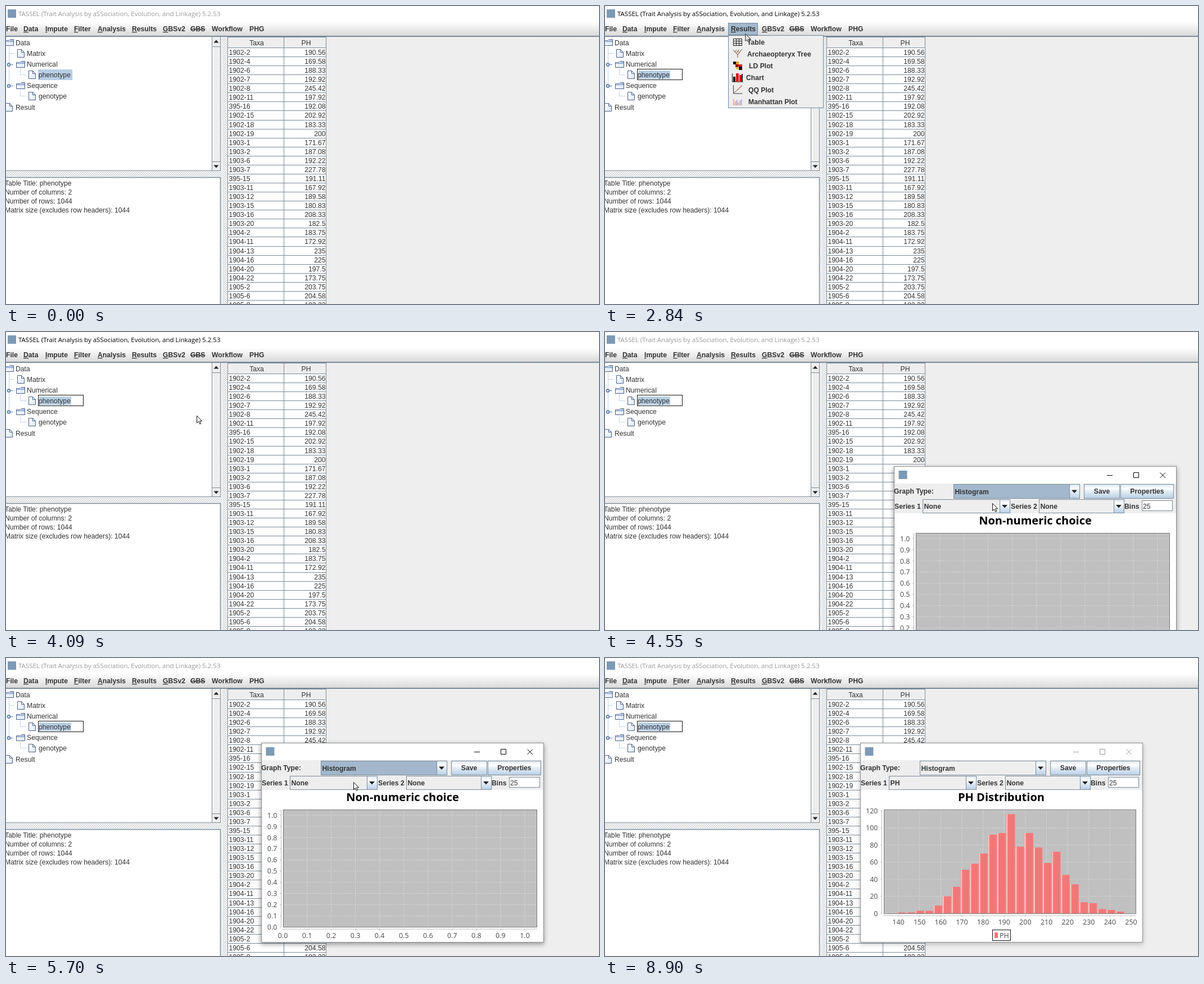
Animation, 1055 px wide and 531 px high, one loop 9750 ms. Source, as an HTML page:

```html
<!DOCTYPE html>
<html lang="en">
<head>
<meta charset="utf-8">
<title>Histogram walkthrough</title>
<style>
html, body { margin: 0; width: 100%; height: 100%; overflow: hidden; background: #eee; }
svg { display: block; width: 100%; height: 100%; }
text { font: 12.2px "Liberation Sans", Arial, sans-serif; fill: #333; white-space: pre; }
.b { font-weight: bold; }
.caption { font: 11.5px "Open Sans", "Noto Sans", sans-serif; }
.tick { font: 12.5px "Noto Sans", sans-serif; fill: #555; }
.heading { font: bold 20px "Noto Sans", sans-serif; fill: #000; }
</style>
</head>
<body>
<svg id="stage" viewBox="0 0 1055 531" xmlns="http://www.w3.org/2000/svg"></svg>
<script>
const LOOP = 9750;
const EDGE = '#7a8a99', SELECT = '#b8cfe5', HOVER = '#a3b8cc', PANEL = '#eeeeee';

const range = (n, fn) => Array.from({ length: n }, (_, i) => fn(i)).join('');
const rect = (x, y, w, h, fill, stroke = 'none', more = '') =>
  `<rect x="${x}" y="${y}" width="${w}" height="${h}" fill="${fill}" stroke="${stroke}" ${more}/>`;
const box = (x, y, w, h, fill, stroke = EDGE, more = '') =>
  rect(x + .5, y + .5, w - 1, h - 1, fill, stroke, more);
const path = (d, stroke = EDGE, fill = 'none', more = '') =>
  `<path d="${d}" stroke="${stroke}" fill="${fill}" ${more}/>`;
const text = (x, y, s, cls = '', anchor = 'start', more = '') =>
  `<text x="${x}" y="${y}" class="${cls}" text-anchor="${anchor}" ${more}>${s}</text>`;
const group = (id, body, more = '') => `<g id="${id}" ${more}>${body}</g>`;

const defs = `<defs>
  <linearGradient id="bar" x2="0" y2="1"><stop stop-color="#fff"/><stop offset="1" stop-color="#dadada"/></linearGradient>
  <linearGradient id="button" x2="0" y2="1"><stop stop-color="#dde8f3"/><stop offset=".3" stop-color="#fff"/>
    <stop offset=".5" stop-color="#e4edf6"/><stop offset="1" stop-color="#b8cfe5"/></linearGradient>
  <linearGradient id="column"><stop stop-color="#f57a7a"/><stop offset=".1" stop-color="#ffe0e0"/>
    <stop offset=".2" stop-color="#f57878"/><stop offset=".8" stop-color="#ee7777"/><stop offset="1" stop-color="#f28484"/></linearGradient>
  <linearGradient id="sheet" x2="1" y2="1"><stop stop-color="#fff"/><stop offset="1" stop-color="#dce8f5"/></linearGradient>
  <pattern id="bumps" width="4" height="4" patternUnits="userSpaceOnUse">
    <path d="M0 0h1v1h-1zM2 2h1v1h-1z" fill="#a9b3bd"/><path d="M1 1h1v1h-1zM3 3h1v1h-1z" fill="#fff"/></pattern>
  <filter id="blur" x="-10%" y="-10%" width="120%" height="120%"><feGaussianBlur stdDeviation="4"/></filter>
</defs>`;

// Main window

const menuNames = [[0, 'File'], [31, '_Data'], [70, '_Impute'], [121, '_Filter'], [163, '_Analysis'],
  [224, '_Results'], [279, '_GBSv2'], [328, '-GBS'], [366, 'Workflow'], [433, 'PHG']];
const decorate = s =>
  s[0] === '_' ? `<tspan text-decoration="underline">${s[1]}</tspan>${s.slice(2)}` :
  s[0] === '-' ? `<tspan text-decoration="line-through">${s.slice(1)}</tspan>` : s;
const menuBar = () =>
  rect(0, 0, 1055, 28, '#fff') + rect(0, 28, 1055, 25, 'url(#bar)') + rect(0, 53, 1055, 2, EDGE) +
  rect(3, 6, 15, 15, '#7d9ab5') +
  text(22, 18, 'TASSEL (Trait Analysis by aSSociation, Evolution, and Linkage) 5.2.53', 'caption', 'start', 'id="title"') +
  group('menuButton', box(219, 30, 53, 22, HOVER)) +
  menuNames.map(([x, s]) => text(x, 45, decorate(s), 'b')).join('');

const folder = (x, y) =>
  path(`M${x + .5} ${y + 11.5}V${y + 2.5}H${x + 7.5}L${x + 9.5} ${y + .5}H${x + 15.5}V${y + 11.5}Z`, '#4a5f85', 'url(#sheet)') +
  path(`M${x + 1} ${y + 4.5}H${x + 15}M${x + 9} ${y + 2.5}H${x + 15}`, '#6382bf');
const sheet = (x, y) =>
  path(`M${x + .5} ${y + .5}H${x + 7.5}L${x + 12.5} ${y + 5.5}V${y + 14.5}H${x + .5}Z`, '#4a5f85', 'url(#sheet)') +
  path(`M${x + 7.5} ${y + .5}V${y + 5.5}H${x + 12.5}`, '#4a5f85');
const handle = y => path(`M7 ${y}H13`, '#6382bf') +
  `<circle cx="5" cy="${y}" r="2.5" fill="#dce8f5" stroke="#4a6fa5" stroke-width="1.4"/>`;
const arrow = (x, y, dir) => path(`M${x - 4.5} ${y - 2.5 * dir}h9l-4.5 ${5 * dir}z`, 'none', '#222');

const tree = () =>
  rect(0, 55, 382, 239, '#fff') + rect(366, 55, 16, 239, PANEL) +
  path('M366.5 55V293M381.5 55V293M0 293.5H382M366 72.5H382M366 277.5H382') +
  path('M368.5 73V277', '#fff') + arrow(374, 63, -1) + arrow(374, 286, 1) +
  path('M5.5 72V142M5 84.5H15M25.5 111V122.5H36M25.5 150V160.5H36', '#c3d4e6') +
  folder(-2, 59) + sheet(20, 77) + folder(18, 98) + sheet(40, 115) + folder(18, 136) + sheet(40, 153) + sheet(-1, 173) +
  handle(104.5) + handle(142.5) +
  group('picked', box(57, 113, 61, 19, SELECT, SELECT, 'id="pickedBox"')) +
  group('editor', box(57, 112, 81, 20, '#fff', '#111') + rect(59, 115, 57, 15, SELECT)) +
  [[17, 70, 'Data'], [37, 89, 'Matrix'], [37, 108, 'Numerical'], [58, 127, 'phenotype'],
   [37, 146, 'Sequence'], [58, 165, 'genotype'], [17, 185, 'Result']].map(a => text(...a)).join('');

const info = () =>
  rect(0, 305, 382, 226, '#fff') + path('M0 305.5H381.5V531', EDGE, 'none', 'stroke-width="1.5"') +
  rect(0, 295, 383, 9, 'url(#bumps)') + rect(385, 55, 8, 476, 'url(#bumps)') +
  ['Table Title: phenotype', 'Number of columns: 2', 'Number of rows: 1044', 'Matrix size (excludes row headers): 1044']
    .map((s, i) => text(-2, 320 + 16.1 * i, s)).join('');

const records = `1902-2 190.56,1902-4 169.58,1902-6 188.33,1902-7 192.92,1902-8 245.42,1902-11 197.92,395-16 192.08,
1902-15 202.92,1902-18 183.33,1902-19 200,1903-1 171.67,1903-2 187.08,1903-6 192.22,1903-7 227.78,395-15 191.11,
1903-11 167.92,1903-12 189.58,1903-15 180.83,1903-16 208.33,1903-20 182.5,1904-2 183.75,1904-11 172.92,1904-13 235,
1904-16 225,1904-20 197.5,1904-22 173.75,1905-2 203.75,1905-6 204.58,1905-8 183.33`
  .split(',').map(s => s.trim().split(' '));
const rowY = i => Math.round(74 + 16.07 * i);
const table = () =>
  rect(394, 75, 176, 456, '#fff') + rect(394, 55, 176, 19, PANEL) +
  text(446, 70, 'Taxa', '', 'middle') + text(534, 70, 'PH', '', 'middle') +
  path('M394.5 55V531M494.5 55V531M569.5 55V531M394 55.5H570') +
  records.map(([name, value], i) =>
    path(`M394 ${rowY(i) + .5}H570`) + text(396.5, rowY(i) + 13, name) + text(568.5, rowY(i) + 13, value, '', 'end')).join('');

// Results menu

const itemTop = i => 53 + 21.15 * i;
const menuIcons = () =>
  path('M228 58.5h16M228 62.5h16M228 66.5h16M228 70.5h16M228.5 58v13M233.5 58v13M238.5 58v13M243.5 58v13', '#222') +
  path('M228 78l8 9v5M244 77l-8 10M231 82l3-4M233 85l5-7M239 84l-3-4', '#7a4b34') +
  rect(228, 99, 5, 5, '#111') + rect(233, 99, 5, 5, '#e0a030') + rect(236, 104, 8, 4, '#d32020') +
  rect(232, 104, 5, 5, '#901010') + rect(238, 108, 6, 6, '#111') + rect(233, 109, 4, 4, '#f0c840') +
  path('M226.5 120v15h19', '#111') + rect(228, 126, 4, 9, '#111') + rect(233, 120, 5, 15, '#d81818') +
  rect(239, 123, 4, 12, '#d81818') + rect(243, 121, 2, 14, '#222') +
  path('M228.5 141v15h16', '#333') + path('M229 155l6-5 9-9', '#d03030') + path('M229 156l15-13', '#bbb') +
  range(8, i => rect(228 + 2 * i, 166 + (i * 5) % 7, 1.6, 11 - (i * 5) % 7, ['#e8a0a0', '#d8c890', '#a8b8d8', '#c8a8c8'][i % 4]));
const resultsMenu = () => group('menu',
  box(219, 52, 170, 130, PANEL, '#6f87a3') + rect(220, 0, 168, 21, HOVER, 'none', 'id="menuHover"') + menuIcons() +
  [[253, 'Table'], [253, 'Archaeopteryx Tree'], [256, 'LD Plot'], [251, 'Chart'], [255, 'QQ Plot'], [255, 'Manhattan Plot']]
    .map(([x, s], i) => text(x, itemTop(i) + 16, s, 'b')).join(''));

// Chart window

const combo = (x, y, w, h, label, id) =>
  box(x, y, w, h, PANEL, EDGE, `id="${id}"`) + box(x + w - 19, y, 19, h, 'url(#button)') +
  path(`M${x + w - 15} ${y + h / 2 - 2.5}h10l-5 5.5z`, 'none', '#222') +
  text(x + 2.5, y + h / 2 + 4.5, label, 'b', 'start', `id="${id}Label"`);
const button = (x, w, label) => box(x, 183, w, 26, 'url(#button)') + text(x + w / 2, 200, label, 'b', 'middle');

const plot = (x, bottom, xs, ys, bars = '') => {
  const grid = xs.map(([p]) => `M${p} 270V${bottom}`).join('') + ys.map(([p]) => `M${x} ${p}H945`).join('');
  const ticks = xs.map(([p]) => `M${p} ${bottom + 4}v2`).join('') + ys.map(([p]) => `M${x - 6} ${p}h2`).join('');
  return rect(x, 270, 945 - x, bottom - 270, '#c0c0c0') +
    path(grid, '#dedede', 'none', 'stroke-dasharray="2 2" stroke-width=".9"') + bars +
    rect(x + .5, 270.5, 944 - x, bottom - 270, 'none', '#777') +
    path(`M${x - 3.5} 270V${bottom}M${x} ${bottom + 4}H945${ticks}`, '#a5a5a5', 'none', 'stroke-width=".8"') +
    xs.map(([p, s]) => text(p, bottom + 20, s, 'tick', 'middle')).join('') +
    ys.map(([p, s]) => text(x - 10.5, p + 4.7, s, 'tick', 'end')).join('');
};
const steps = (n, start, gap, label) => Array.from({ length: n }, (_, i) => [start + gap * i, label(i)]);
const tenth = i => (i / 10).toFixed(1);

const counts = [1, 1, 3, 3, 9, 20, 31, 51, 58, 70, 92, 94, 116, 78, 94, 77, 59, 72, 45, 34, 13, 12, 5, 4, 2];
const columns = () => counts.map((n, i) =>
  rect(519 + 16.2 * i, 455 - 1.523 * n, 16.2, 1.523 * n, 'url(#column)')).join('');

const emptyChart = () => group('emptyChart',
  text(705.5, 255, 'Non-numeric choice', 'heading', 'middle') +
  plot(493, 479, steps(11, 492.5, 43.05, tenth), steps(11, 479.3, -19.93, tenth)));
const histogram = () => group('histogram',
  text(705, 255, 'PH Distribution', 'heading', 'middle') +
  plot(496, 455, steps(12, 522, 37.64, i => 140 + 10 * i), steps(7, 455, -30.45, i => 20 * i), columns()) +
  box(689, 484, 33, 20, '#fff', '#111') + rect(693, 489, 6, 10, '#f57878') + text(702, 499, 'PH', 'tick'));

const listTop = i => 236 + 18.1 * i;
const seriesList = () => group('list',
  box(504, 235, 157, 56, PANEL, '#222') + rect(505, 0, 155, 18.2, HOVER, 'none', 'id="listHover"') +
  ['None', 'Taxa', 'PH'].map((s, i) => text(507, listTop(i) + 14, s, 'b')).join(''));

const chartWindow = () => group('chart',
  rect(453, 154, 504, 356, '#000', 'none', 'id="shadow" filter="url(#blur)"') +
  box(454, 151, 503, 356, '#fff', '#8c8c8c') + rect(462.5, 159, 15, 15, '#7d9ab5') +
  path('M833 167.5h10M880.5 162.5h9v9h-9zM927.5 162.5l9.5 9.5M937 162.5l-9.5 9.5', '#000', 'none', 'id="controls"') +
  rect(455, 182, 501, 53, PANEL) +
  text(454, 200, 'Graph Type:', 'b') + combo(560, 183, 225, 26, 'Histogram', 'kind') +
  button(792, 64, 'Save') + button(857, 95, 'Properties') +
  text(455, 227, 'Series 1', 'b') + combo(505, 210, 156, 25, 'None', 'first') +
  text(662, 227, 'Series 2', 'b') + combo(712, 210, 152, 25, 'None', 'second') +
  text(864, 227, 'Bins', 'b') + box(895, 212, 55, 19, '#fff') + text(897, 227, '25') +
  emptyChart() + histogram() + seriesList());

const pointer = () => group('pointer',
  '<circle id="press" r="12" fill="#f0ea20" opacity=".82"/>' +
  path('M.5 .5V13.5L3.5 10.7L5.6 15.3L7.7 14.4L5.6 9.9H9.6Z', '#111', '#fff'));

document.getElementById('stage').innerHTML =
  defs + rect(0, 0, 1055, 531, PANEL) + menuBar() + tree() + info() + table() + resultsMenu() + chartWindow() + pointer();

// Motion

// [first step, last step, number of steps, x, y, ease-out power]
const moves = [
  [130, 1070, 13, 128, 120, 1.5], [1140, 1140, 1, 113, 119, 1],
  [1620, 1770, 3, 140, 68, 1], [1850, 2350, 7, 245, 32, 1.6],
  [2840, 3230, 6, 266, 113, 1.3], [3550, 3550, 1, 268, 117, 1],
  [4090, 4550, 7, 689, 305, 1.2], [4620, 4780, 3, 812, 254, 1.3],
  [4950, 5160, 3, 760, 178, 1], [5390, 5390, 1, 752, 166, 1],
  [5560, 5700, 3, 618, 221, 1], [5780, 5920, 3, 602, 224, 1.3],
  [6390, 6860, 7, 605, 278, 1.3], [7250, 7390, 3, 645, 302, 1],
  [7540, 8420, 13, 1010, 540, 1.2]];
const presses = [[1140, 1390], [2430, 2610], [3700, 3920], [4780, 5390], [5990, 6240], [7010, 7080]];

function pointerAt(t) {
  let x = 1000, y = 560;
  for (const [start, end, count, toX, toY, power] of moves) {
    if (t < start) break;
    const gap = (end - start) / Math.max(1, count - 1);
    const step = gap ? Math.min(count, Math.floor((t - start) / gap + 1e-6) + 1) : 1;
    const p = 1 - (1 - step / count) ** power;
    x += (toX - x) * p;
    y += (toY - y) * p;
  }
  return [x, y];
}

const el = id => document.getElementById(id);
const show = (id, on) => el(id).setAttribute('display', on ? 'inline' : 'none');
const set = (id, name, value) => el(id).setAttribute(name, value);

function draw(t) {
  const within = (a, b) => t >= a && t < b;
  const [x, y] = pointerAt(t);
  set('pointer', 'transform', `translate(${x} ${y})`);
  show('press', presses.some(([a, b]) => within(a, b)));

  el('title').style.fill = within(1220, 4250) ? '#000' : '#999';
  set('pickedBox', 'stroke', t >= 1220 ? '#6382bf' : SELECT);
  show('picked', t < 2410);
  show('editor', t >= 2410);

  const menuOpen = within(2500, 3850);
  show('menu', menuOpen);
  show('menuButton', menuOpen);
  const item = Math.floor((y - 53) / 21.15);
  show('menuHover', menuOpen && item >= 0);
  set('menuHover', 'y', itemTop(Math.max(0, item)));

  show('chart', t >= 4250);
  set('chart', 'opacity', Math.min(1, .4 + (t - 4250) / 250));
  const [dx, dy] = t < 4950 ? [60, 88] : t < 5390 ? [x - 752, y - 166] : [0, 0];
  set('chart', 'transform', `translate(${dx} ${dy})`);
  const active = t < 8900, plotted = t >= 7080;
  set('controls', 'stroke', active ? '#000' : '#999');
  set('shadow', 'opacity', active ? .38 : .22);
  set('kind', 'fill', t < 6070 ? HOVER : PANEL);
  set('first', 'fill', plotted && active ? HOVER : PANEL);
  el('firstLabel').textContent = plotted ? 'PH' : 'None';
  show('emptyChart', !plotted);
  show('histogram', plotted);
  show('list', within(6070, 7080));
  set('listHover', 'y', listTop(Math.min(2, Math.max(0, Math.floor((y - 236) / 18.1)))));
}

const began = performance.now();
function tick() {
  draw((performance.now() - began) % LOOP);
  requestAnimationFrame(tick);
}
tick();
</script>
</body>
</html>
```
